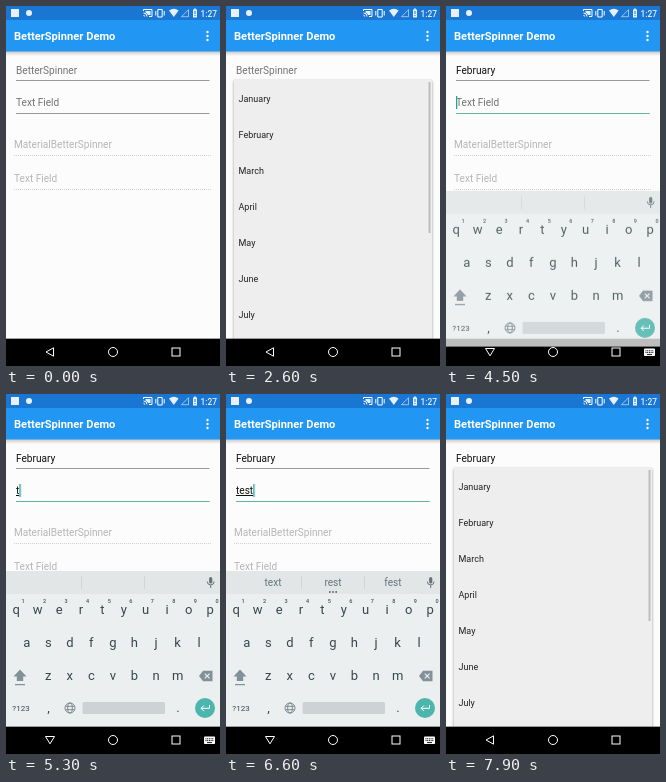
Animation of 214 by 360 pixels, one loop 8000 ms. Source, as an HTML page:

```html
<!DOCTYPE html>
<html lang="en">
<head>
<meta charset="utf-8">
<title>BetterSpinner Demo</title>
<style>
html, body { margin: 0; width: 100%; height: 100%; overflow: hidden; background: #fcfcfc; }
svg { display: block; width: 214px; height: 360px; font: 10.1px Roboto, sans-serif; }
.hint { fill: #747474; }
.float { fill: #b6b6b6; }
.ink { fill: #111; }
.rule { stroke: #999; }
.dots { stroke: #cfcfcf; stroke-dasharray: 1 1; }
.teal { stroke: #5fb59e; }
.line { fill: none; stroke: #fff; stroke-width: 1; }
.month { font-size: 9px; fill: #222; }
.keys { fill: #37474a; text-anchor: middle; }
.letter { font-size: 13px; }
.digit { font-size: 5.5px; font-weight: 500; fill: #46545b; }
.symbol { font-size: 8px; }
.word { fill: #66757c; }

/* one loop is 8 s, so 1% is 80 ms */
.step { opacity: 0; animation: 8s step-end infinite; }
.focus1 { animation-name: focus1; }
.focus2 { animation-name: focus2; }
.empty1 { animation-name: empty1; }
.filled1 { animation-name: filled1; }
.empty2 { animation-name: empty2; }
.t1 { animation-name: t1; }
.t2 { animation-name: t2; }
.t3 { animation-name: t3; }
.t4 { animation-name: t4; }
.words { animation-name: words; }
.back { animation-name: back; }
.caret { animation-name: blink, caret; }
.popup { opacity: 0; animation: popup 8s linear infinite; }
.board { opacity: 0; animation: board 8s linear infinite; }
.bar { animation: bar 8s linear infinite; }

@keyframes focus1 { 0% { opacity: 0 } 21.8% { opacity: 1 } 53.5% { opacity: 0 } 92% { opacity: 1 } }
@keyframes focus2 { 0% { opacity: 0 } 53.5% { opacity: 1 } 92% { opacity: 0 } }
@keyframes empty1 { 0% { opacity: 1 } 39% { opacity: 0 } }
@keyframes filled1 { 0% { opacity: 0 } 39% { opacity: 1 } }
@keyframes empty2 { 0% { opacity: 1 } 65% { opacity: 0 } }
@keyframes t1 { 0% { opacity: 0 } 65% { opacity: 1 } 70% { opacity: 0 } }
@keyframes t2 { 0% { opacity: 0 } 70% { opacity: 1 } 73.75% { opacity: 0 } }
@keyframes t3 { 0% { opacity: 0 } 73.75% { opacity: 1 } 77.5% { opacity: 0 } }
@keyframes t4 { 0% { opacity: 0 } 77.5% { opacity: 1 } }
@keyframes words { 0% { opacity: 0 } 78.75% { opacity: 1 } }
@keyframes back { 0% { opacity: 1 } 54% { opacity: 0 } 92% { opacity: 1 } }
@keyframes blink {
  0% { opacity: 0 } 53.5% { opacity: 1 } 60% { opacity: 0 } 65% { opacity: 1 }
  84% { opacity: 0 } 90% { opacity: 1 } 92% { opacity: 0 }
}
@keyframes caret {
  0% { transform: none } 65% { transform: translateX(3.4px) } 70% { transform: translateX(8.8px) }
  73.75% { transform: translateX(14px) } 77.5% { transform: translateX(17.3px) }
}
@keyframes popup {
  0%, 23.75% { opacity: 0 } 26%, 38.2% { opacity: 1 } 40%, 94.5% { opacity: 0 } 97%, 100% { opacity: 1 }
}
@keyframes board {
  0%, 54% { opacity: 0; transform: translateY(32px) }
  56% { opacity: .8 }
  57%, 91.5% { opacity: 1; transform: none }
  94%, 100% { opacity: 0; transform: translateY(32px) }
}
@keyframes bar {
  0%, 53.9% { transform: none }
  54% { transform: translateY(32px) }
  57%, 100% { transform: none }
}
</style>
</head>
<body>
<svg viewBox="0 0 214 360">
  <defs>
    <linearGradient id="shade" x2="0" y2="1">
      <stop stop-opacity=".22"/><stop offset="1" stop-opacity="0"/>
    </linearGradient>
    <filter id="blur" x="-5%" y="-5%" width="110%" height="110%"><feGaussianBlur stdDeviation="1.6"/></filter>
  </defs>

  <rect width="214" height="360" fill="#fcfcfc"/>

  <!-- form -->
  <text class="hint step empty1" x="10" y="68">BetterSpinner</text>
  <text class="ink step filled1" x="10" y="68">February</text>
  <path class="rule" d="M10 74.5H203.5"/>
  <path class="teal step focus1" d="M10 74.5H203.5"/>

  <text class="hint step empty2" x="10" y="100">Text Field</text>
  <g class="ink" text-decoration="underline">
    <text class="step t1" x="10" y="100">t</text>
    <text class="step t2" x="10" y="100">te</text>
    <text class="step t3" x="10" y="100">tes</text>
    <text class="step t4" x="10" y="100">test</text>
  </g>
  <path class="rule" d="M10 107.5H203.5"/>
  <path class="teal step focus2" d="M10 107.5H203.5"/>
  <rect class="step caret" x="10" y="90" width="1.3" height="13" fill="#26a69a"/>

  <text class="float" x="8" y="141.5">MaterialBetterSpinner</text>
  <path class="dots" d="M8 149.5H205"/>
  <text class="float" x="8" y="175.5">Text Field</text>
  <path class="dots" d="M8 183.5H205"/>

  <!-- app bar -->
  <rect y="45" width="214" height="5" fill="url(#shade)"/>
  <rect width="214" height="45.5" fill="#2196f3"/>
  <rect width="214" height="14" fill="#1976d2"/>
  <text x="8" y="34" font-size="11.15" font-weight="600" fill="#fff">BetterSpinner Demo</text>
  <g fill="#fff">
    <circle cx="201.5" cy="26" r="1.2"/><circle cx="201.5" cy="30" r="1.2"/><circle cx="201.5" cy="34" r="1.2"/>
  </g>

  <!-- status icons -->
  <g fill="#e8f1fb">
    <rect x="5" y="3" width="8" height="8"/>
    <circle cx="23" cy="7" r="3"/>
    <path d="M139.500 5h5v4h-2.500a4 4 0 0 0-2.500-2.500z"/>
    <path d="M163 4.500q4.800-3.600 9.600 0L167.800 11z"/>
    <path d="M187 3.500h1.100v-1h1.800v1H191V11.500h-4z"/>
    <text x="194.500" y="10.600" font-size="8.300" font-weight="500">1:27</text>
  </g>
  <path d="M189 5v3m0 1v1" stroke="#1976d2"/>
  <path class="line" d="M137.500 5V3.500h8.500v7h-3M137.500 7a3.500 3.500 0 0 1 3.500 3.500M137.500 9.300a1.200 1.200 0 0 1 1.200 1.200"/>
  <path class="line" d="M151.800 3.500h4.400v7.500h-4.400zM149.800 5v4.500M158.200 5v4.500"/>
  <path class="line" d="M182.500 3.700v7h-7z" opacity=".55"/>

  <!-- drop-down -->
  <g class="popup">
    <rect x="8" y="75" width="198" height="260" opacity=".4" filter="url(#blur)"/>
    <rect x="8" y="73" width="198" height="262" rx="1" fill="#eee"/>
    <rect x="202.5" y="76" width="2" height="151" fill="#bdbdbd"/>
    <g id="months"></g>
  </g>

  <!-- keyboard -->
  <g class="board">
    <rect y="177" width="214" height="156" fill="#eceff0"/>
    <rect y="177" width="214" height="23" fill="#e2e6e7"/>
    <path d="M75.5 182v13M138.5 182v13" stroke="#cfd5d8"/>
    <g class="keys" id="keys"></g>
    <g class="keys step words">
      <text class="word" x="47" y="191.8">text</text>
      <text class="word" x="107" y="191.8">rest</text>
      <text class="word" x="167" y="191.8">fest</text>
      <path d="M103 198h1.600m1.600 0h1.600m1.600 0h1.600" stroke="#46545b" stroke-width="1.6"/>
    </g>
    <!-- microphone -->
    <g fill="none" stroke="#667479">
      <path d="M204.700 184.500v3.500" stroke-width="3.200" stroke-linecap="round"/>
      <path d="M201.300 187.500a3.400 3.400 0 0 0 6.800 0M204.700 191v3"/>
    </g>
    <!-- shift, delete -->
    <path d="M14 275.500l6.500 7h-3.300v4.500h-6.400v-4.500H7.500zM9 290h10v1.300H9z" fill="#829097"/>
    <path d="M193 282l4-5.200h9.500v10.400H197z" fill="#829097"/>
    <path d="M198.800 279.600l4.800 4.800m0-4.800l-4.800 4.800" stroke="#eceff0" stroke-width="1.2"/>
    <!-- globe -->
    <g fill="none" stroke="#718087" stroke-width=".9">
      <circle cx="64" cy="314" r="5"/><ellipse cx="64" cy="314" rx="2.3" ry="5"/>
      <path d="M59.500 312.300h9M59.500 315.700h9"/>
    </g>
    <rect x="76.5" y="308" width="82.5" height="12" rx="1.5" fill="#cdd3d5"/>
    <circle cx="199" cy="314" r="10" fill="#4db6ac"/>
    <path class="line" stroke-width="1.3" d="M203.500 311v3.300h-8.300m2.700-2.800l-2.800 2.800 2.800 2.800"/>
  </g>

  <!-- navigation: the black bar slides in with the keyboard -->
  <rect y="332.700" width="214" height="28" fill="#bdbdbd"/>
  <rect class="bar" y="332.700" width="214" height="28"/>
  <path class="line step back" d="M40 346l7.500-4.200v8.400z"/>
  <g class="step focus2">
    <path class="line" d="M39.500 342.500h9l-4.500 7.300z"/>
    <rect x="198" y="342.5" width="11" height="7.500" rx=".8" fill="#fff"/>
    <path d="M199.500 344.800h8M199.500 346.600h8" stroke="#000" stroke-dasharray="1 .7"/>
    <path d="M201 348.600h5" stroke="#000" stroke-width=".9"/>
  </g>
  <circle class="line" cx="107" cy="346" r="4.5"/>
  <rect class="line" x="166" y="342" width="8" height="8"/>
</svg>
<script>
const put = (id, x, y, text, cls) => {
  const node = document.createElementNS("http://www.w3.org/2000/svg", "text");
  node.setAttribute("x", x);
  node.setAttribute("y", y);
  node.setAttribute("class", cls);
  node.textContent = text;
  document.getElementById(id).append(node);
};

"January February March April May June July".split(" ")
  .forEach((name, i) => put("months", 12.5, 96 + 36 * i, name, "month"));

const pitch = 21.55;
[["qwertyuiop", 10.2, 220], ["asdfghjkl", 20.7, 253], ["zxcvbnm", 42.3, 286]].forEach(([row, x, y]) =>
  [...row].forEach((key, i) => put("keys", x + pitch * i, y, key, "letter")));
[..."1234567890"].forEach((digit, i) => put("keys", 17 + pitch * i, 208.5, digit, "digit"));
put("keys", 15, 317, "?123", "symbol");
put("keys", 42.5, 318, ",", "letter");
put("keys", 172, 318, ".", "letter");
</script>
</body>
</html>
```
